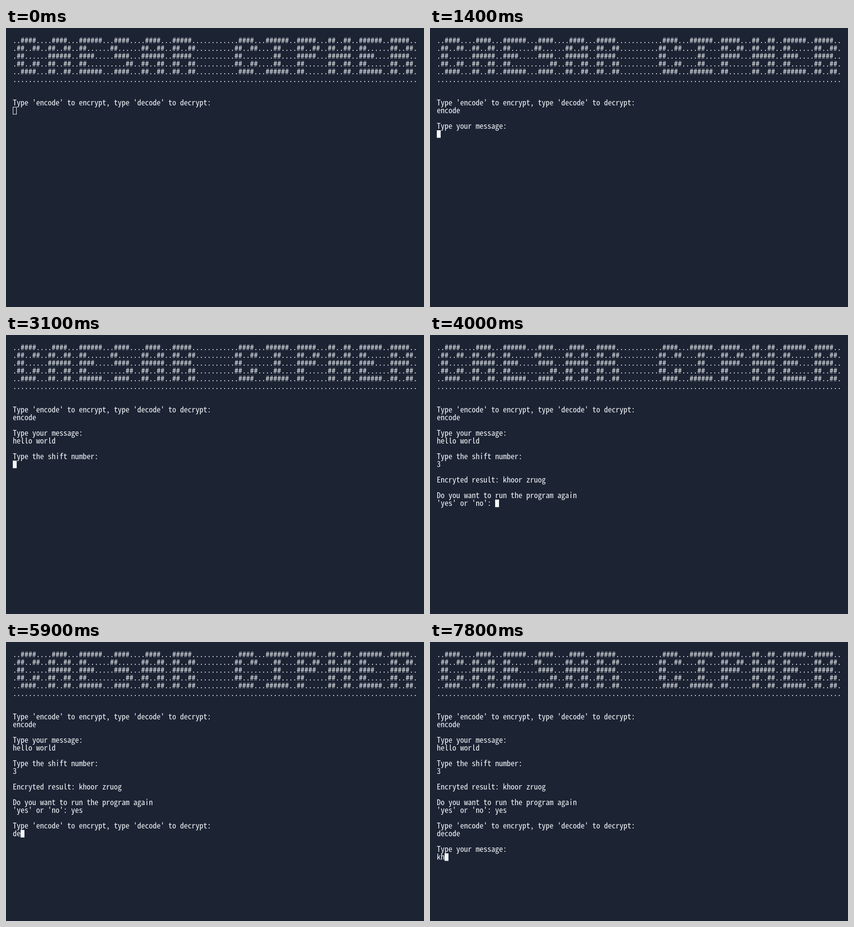
Write an HTML page with a canvas that moves like this. It is 860 px wide and 573 px high and loops after 8 s.

```html
<!DOCTYPE html>
<html lang="en">
<head>
<meta charset="utf-8">
<title>Caesar cipher terminal</title>
<style>
  html, body { margin: 0; width: 100%; height: 100%; overflow: hidden; background: #1c2333; }
  canvas { display: block; width: 860px; height: 573px; }
</style>
</head>
<body>
<canvas id="screen" width="860" height="573"></canvas>
<script>
const ctx = document.getElementById('screen').getContext('2d', { alpha: false });
const LOOP = 8000, LEFT = 14, TOP = 18, CELL = 8, LINE = 16, BASE = 13;
const CURSOR_H = 15.5;
const BG = '#1c2333', FG = '#f5f9fc';

// Banner letters, five rows of eight cells each
const GLYPHS = {
  C: '..####.. .##..##. .##..... .##..##. ..####..',
  A: '..####.. .##..##. .######. .##..##. .##..##.',
  E: '.######. .##..... .####... .##..... .######.',
  S: '..####.. .##..... ..####.. .....##. ..####..',
  R: '.#####.. .##..##. .#####.. .##..##. .##..##.',
  I: '.######. ...##... ...##... ...##... .######.',
  P: '.#####.. .##..##. .#####.. .##..... .##.....',
  H: '.##..##. .##..##. .######. .##..##. .##..##.'
};

function banner(title) {
  const rows = [];
  for (let r = 0; r < 6; r++) {
    rows.push([...title].map(c => GLYPHS[c]?.split(' ')[r] ?? '........').join(''));
  }
  return rows.join('\n');
}

const MODE = "Type 'encode' to encrypt, type 'decode' to decrypt:\n";
const MESSAGE = '\n\nType your message:\n';
const SHIFT = '\n\nType the shift number:\n';
const RESULT = "\n\nEncryted result: khoor zruog\n\nDo you want to run the program again\n'yes' or 'no': ";

// Output added to the terminal at each time in ms
const EVENTS = [
  [0, banner('CAESAR CIPHER') + '\n\n\n' + MODE],
  [800, 'e'], [1000, 'n'], [1100, 'c'], [1200, 'o'], [1300, 'de'], [1400, MESSAGE],
  [2000, 'h'], [2200, 'e'], [2400, 'll'], [2500, 'o '],
  [2700, 'w'], [2800, 'o'], [2900, 'r'], [3000, 'ld'], [3100, SHIFT],
  [3800, '3'], [4000, RESULT],
  [5000, 'y'], [5100, 'e'], [5300, 's'], [5500, '\n\n' + MODE],
  [5900, 'de'], [6000, 'c'], [6200, 'o'], [6300, 'de'], [6500, MESSAGE],
  [7400, 'k'], [7800, 'h']
];
const FOCUS_AT = 100;

function drawCursor(x, y, focused) {
  if (focused) {
    ctx.fillRect(x, y, CELL, CURSOR_H);
  } else {
    ctx.strokeRect(x + 0.5, y + 0.5, CELL - 1, CURSOR_H - 1);
  }
}

function draw(t) {
  ctx.fillStyle = BG;
  ctx.fillRect(0, 0, 860, 573);
  ctx.fillStyle = ctx.strokeStyle = FG;
  ctx.lineWidth = 1;
  ctx.font = '16px "Noto Sans Mono CJK JP", "Noto Sans Mono CJK SC", "Noto Sans Mono", monospace';

  const text = EVENTS.filter(([at]) => at <= t).map(e => e[1]).join('');
  let x = LEFT, y = TOP;
  for (const c of text) {
    if (c === '\n') {
      x = LEFT;
      y += LINE;
    } else {
      ctx.fillText(c, x, y + BASE);
      x += CELL;
    }
  }
  drawCursor(x, y, t >= FOCUS_AT);
}

const start = performance.now();
function tick() {
  draw((performance.now() - start) % LOOP);
  requestAnimationFrame(tick);
}
tick();
</script>
</body>
</html>
```
